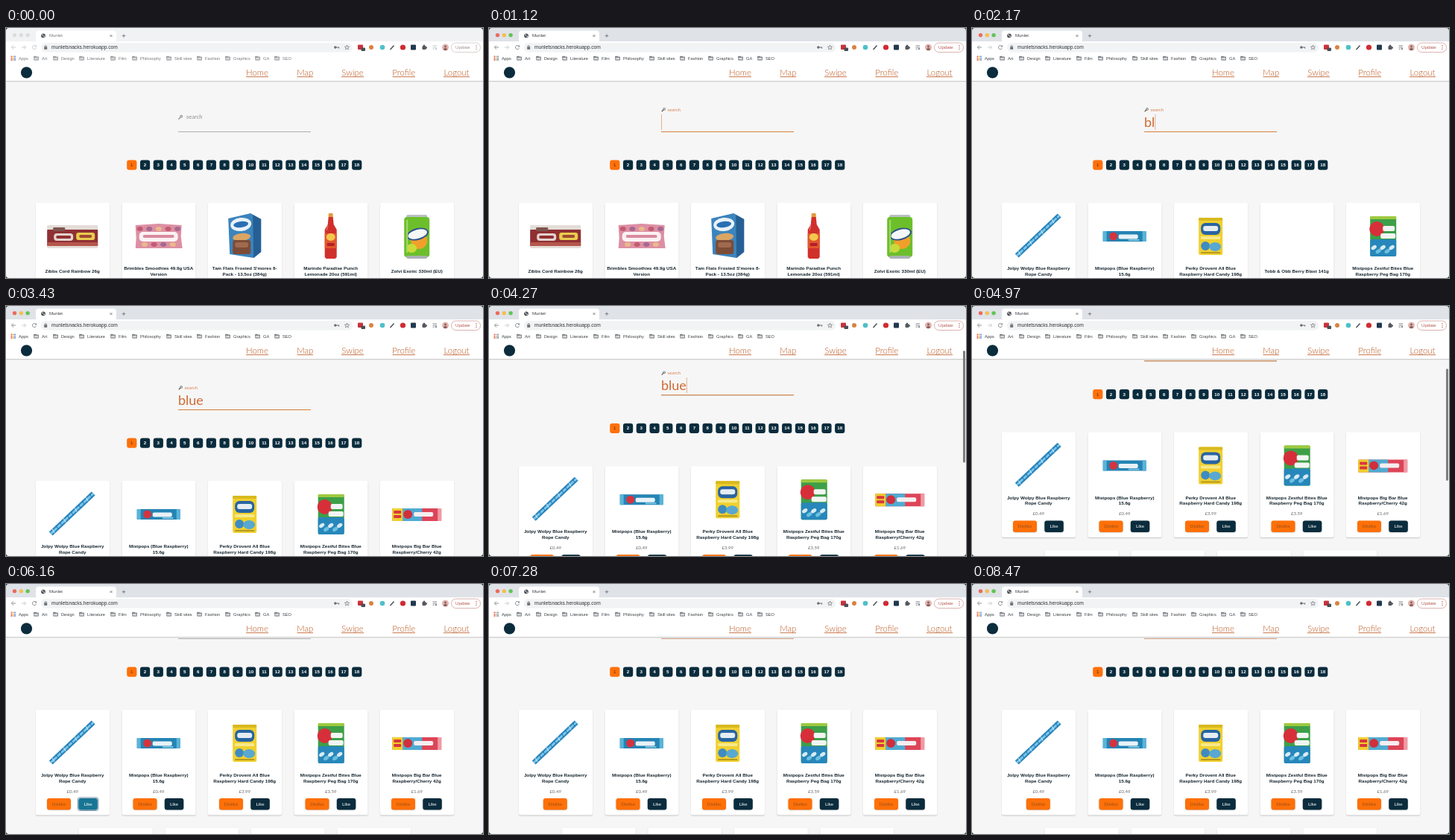
Recreate the animation shown at these times as an HTML page with a canvas. Size 640 by 336 pixels, loop 8.54 s.

```html
<!DOCTYPE html>
<html lang="en">
<head>
<meta charset="utf-8">
<title>Snack search</title>
<style>
html, body { margin: 0; width: 100%; height: 100%; overflow: hidden; background: #fff; }
canvas { display: block; width: 640px; height: 336px; }
</style>
</head>
<body>
<canvas id="stage"></canvas>
<script>
const W = 640, H = 336, LOOP = 8540, STEP = 70;
const NAVY = '#0a2c3d', ORANGE = '#ff7008', RUST = '#cf6a33', LINK = '#b9541c', INK = '#6a6e73';
const ARIAL = '"Liberation Sans", Arial, sans-serif', LATO = 'Lato, "Open Sans", sans-serif';

// moments of the interaction, in ms
const FOCUS = 840, BLUR = 5600, LIKED = 6580;
const KEYS = [[1820, 'b'], [2100, 'bl'], [2450, 'blu'], [2870, 'blue']];
const SCROLL = { from: 4120, to: 5040, by: 66 };

const canvas = document.getElementById('stage');
const ratio = window.devicePixelRatio || 1;
canvas.width = W * ratio;
canvas.height = H * ratio;
const c = canvas.getContext('2d');
c.scale(ratio, ratio);

const clamp = v => Math.max(0, Math.min(1, v));
const mix = (a, b, p) => a + (b - a) * p;

function box(x, y, w, h, fill, r = 0) {
  c.fillStyle = fill;
  c.beginPath();
  c.roundRect(x, y, w, h, r);
  c.fill();
}
function frame(x, y, w, h, color, width, r = 0) {
  c.strokeStyle = color;
  c.lineWidth = width;
  c.beginPath();
  c.roundRect(x, y, w, h, r);
  c.stroke();
}
function oval(x, y, rx, ry, fill, turn = 0) {
  c.fillStyle = fill;
  c.beginPath();
  c.ellipse(x, y, rx, ry, turn, 0, 7);
  c.fill();
}
const dot = (x, y, r, fill) => oval(x, y, r, r, fill);
function poly(fill, ...p) {
  c.fillStyle = fill;
  c.beginPath();
  for (let i = 0; i < p.length; i += 2) c.lineTo(p[i], p[i + 1]);
  c.closePath();
  c.fill();
}
function line(color, width, ...p) {
  c.strokeStyle = color;
  c.lineWidth = width;
  c.beginPath();
  for (let i = 0; i < p.length; i += 2) c.lineTo(p[i], p[i + 1]);
  c.stroke();
}
function text(s, x, y, font, fill, align = 'left', base = 'middle') {
  c.font = font;
  c.fillStyle = fill;
  c.textAlign = align;
  c.textBaseline = base;
  c.fillText(s, x, y);
}
function shadow(color, blur, dy) {
  c.shadowColor = color;
  c.shadowBlur = blur * ratio;
  c.shadowOffsetY = dy * ratio;
}
const noShadow = () => shadow('transparent', 0, 0);

// pack shots, drawn around their own centre
const art = {
  cord() {
    box(-34, -15, 68, 31, '#e4ddd8', 1);
    box(-34, -9, 68, 22, '#8f3033', 1);
    box(-34, 8, 68, 5, '#b5564c', 1);
    box(-26, -12, 16, 5, '#7d5550', 1);
    box(-25, -4, 26, 10, '#e3d3cd', 4);
    box(-22, -1, 20, 4, '#8f3033', 2);
    box(5, -5, 25, 10, '#e9cd4d', 3);
    box(9, -2, 17, 4, '#a04a34', 2);
  },
  pouch() {
    poly('#dd8fa3', -31, -15, 0, -17, 31, -15, 30, 0, 32, 16, 0, 16, -31, 16, -30, 2);
    for (let i = 0; i < 9; i++) {
      oval(-25 + i * 6.3, i % 2 ? 11 : -10, 4, 3, ['#c25a72', '#eab98a', '#a5688f'][i % 3]);
    }
    box(-26, -6, 52, 13, '#fbf2f4', 5);
    box(-21, -2, 42, 4, '#d98ba0', 2);
  },
  carton() {
    poly('#3c84bd', -22, -24, 8, -31, 22, -23, 22, 21, 12, 29, -20, 24);
    poly('#265f94', 11, -29, 22, -23, 22, 21, 12, 29);
    oval(-5, -16, 14, 9, '#e9f2f8', -0.12);
    oval(-5, -16, 10, 4, '#2a6fb4', -0.12);
    oval(-4, 1, 12, 5, '#dba563', -0.1);
    box(-16, 5, 24, 19, '#7d4c36', 3);
    box(-13, 8, 18, 7, '#a06a4e', 3);
  },
  bottle() {
    box(-3, -31, 6, 6, '#e39a3a', 1);
    poly('#d0302c', -3, -26, 3, -26, 4, -16, 8, -9, 8, 28, 6, 30, -6, 30, -8, 28, -8, -9, -4, -16);
    box(-8, -4, 16, 20, '#e2572c');
    oval(0, 1, 6, 5, '#f2c84c');
    box(-5, 9, 10, 4, '#b51e2d', 1);
    line('#f08a80', 1, -4, -15, -5.5, -8);
  },
  can() {
    box(-14, -29, 28, 5, '#b9c0c3', 2);
    box(-17, -26, 34, 54, '#6cbf2a', 4);
    box(-14, 26, 28, 4, '#a9b1b3', 2);
    dot(3, 6, 11, '#f0a02a');
    oval(-7, 16, 7, 6, '#c8db39');
    oval(1, -3, 15, 8, '#2c4f8f', -0.25);
    oval(1, -3, 13, 6, '#f4f7f5', -0.25);
    line('#a5d970', 2, -13, -22, -13, 22);
  },
  stick() {
    line('#2c86bd', 7, -29, 26, 28, -28);
    line('#7cc8ec', 2.5, -29, 26, 28, -28);
    for (let i = 0; i < 11; i++) {
      const x = -26 + i * 5, y = 23 - i * 4.75;
      line(i % 3 ? '#1f6fa8' : '#d9eef8', 1, x - 1, y - 3, x + 2, y + 2);
    }
  },
  bar() {
    box(-29, -7, 58, 14, '#2484b4', 1);
    box(-29, -7, 5, 14, '#5ab4d8');
    box(24, -7, 5, 14, '#5ab4d8');
    dot(-15, 0, 5.5, '#d5333f');
    box(-8, -2.5, 26, 6, '#e8f2f7', 2);
    box(5, 4, 15, 2, '#7ac4e0', 1);
  },
  bag() {
    box(-16, -25, 32, 50, '#f0d02f', 2);
    box(-16, -25, 32, 4, '#d8b91f', 1);
    box(-13, -18, 26, 16, '#2864a2', 6);
    box(-10, -14, 20, 7, '#e4edf2', 3);
    box(-13, 0, 26, 4, '#f7e98a', 1);
    oval(-7, 13, 6, 6, '#3f8bc0');
    oval(6, 14, 8, 6, '#58a8d2');
    box(-13, 21, 26, 2, '#b69a20');
  },
  bites() {
    box(-17, -27, 35, 54, '#3d9f48', 2);
    box(-17, 4, 35, 23, '#2787bb', 2);
    box(-17, -27, 35, 4, '#9fca3f', 1);
    dot(-8, -10, 10, '#d62f3a');
    box(0, -14, 16, 7, '#f2f5f3', 2);
    box(-3, -4, 20, 7, '#f2f5f3', 2);
    for (let i = 0; i < 5; i++) oval(-12 + i * 6, 15 + i % 2 * 5, 4, 2.5, i % 2 ? '#6cc0df' : '#d8eaf2', -0.6);
  },
  bigBar() {
    box(-33, -8, 66, 17, '#dd4557', 1);
    box(-19, -8, 26, 17, '#4fabd2');
    box(-33, -8, 14, 17, '#f0cf2e', 1);
    box(-31, -5, 10, 4, '#d8383d', 1);
    box(-31, 1, 10, 4, '#d8383d', 1);
    dot(-12, 0, 6, '#d02f3b');
    box(-4, -3, 26, 6, '#f5eef0', 2);
    box(28, -8, 5, 17, '#ef9aa6');
  }
};

const item = (pic, price, ...title) => ({ pic, price, title });
const stick = item('stick', '£0.49', 'Jolpy Wolpy Blue Raspberry', 'Rope Candy');
const bar = item('bar', '£0.49', 'Mistpops (Blue Raspberry)', '15.6g');
const bag = item('bag', '£3.99', 'Perky Drovent All Blue', 'Raspberry Hard Candy 198g');
const blast = item('', '£1.99', 'Tobb & Obb Berry Blast 141g');
const bites = item('bites', '£3.59', 'Mistpops Zestful Bites Blue', 'Raspberry Peg Bag 170g');
const bigBar = item('bigBar', '£1.69', 'Mistpops Big Bar Blue', 'Raspberry/Cherry 42g');
const all = [
  item('cord', '£1.49', 'Zibbs Cord Rainbow 26g'),
  item('pouch', '£1.29', 'Brimbles Smoothies 49.9g USA', 'Version'),
  item('carton', '£4.99', "Tam Flats Frosted S'mores 8-", 'Pack - 13.5oz (384g)'),
  item('bottle', '£2.99', 'Marindo Paradise Punch', 'Lemonade 20oz (591ml)'),
  item('can', '£1.29', 'Zolvi Exotic 330ml (EU)')
];
function results(query) {
  if (query.length < 2) return all;
  return query === 'bl' ? [stick, bar, bag, blast, bites] : [stick, bar, bag, bites, bigBar];
}

function magnifier(x, y, s) {
  line('#6b4a35', 1.3 * s, x - 2.6 * s, y + 2.8 * s, x, y);
  dot(x + 1.2 * s, y - 1.2 * s, 2 * s, '#54606a');
  dot(x + 1.2 * s, y - 1.2 * s, 1.2 * s, '#c3dbe6');
}

function folder(x, color) {
  box(x - 3.2, 37.8, 3.4, 2, color, 0.5);
  box(x - 3.2, 38.6, 6.6, 4.8, color, 0.6);
  box(x - 2.4, 39.7, 5, 2.8, '#d5d7d9');
}

// the window is dimmed until it is clicked
function browser(active) {
  const arrow = active ? '#85888d' : '#c6c8cb';
  const label = active ? '#3c4043' : '#77797c';
  const alert = active ? '#b8564e' : '#a08c8a';
  const lights = active ? ['#ec6a5e', '#f4be4f', '#61c454'] : ['#dcdcdc', '#dcdcdc', '#dcdcdc'];

  box(0, 0, W, 18, active ? '#dfe2e7' : '#f1f2f3');
  lights.forEach((f, i) => dot(11.5 + i * 8.8, 9.6, 2.7, f));
  box(40, 3.5, 108, 16, '#fff', 4);
  dot(50, 10.3, 2.9, '#4f5357');
  oval(49, 9.4, 1.2, 0.8, '#c9cbcd', 0.6);
  oval(51.2, 11.4, 0.9, 1.1, '#c9cbcd');
  text('Munlet', 58, 10.5, '6px ' + ARIAL, label);
  line(INK, 0.8, 139.5, 9, 142.5, 12);
  line(INK, 0.8, 142.5, 9, 139.5, 12);
  line(INK, 0.8, 155.7, 10.5, 160.3, 10.5);
  line(INK, 0.8, 158, 8.2, 158, 12.8);

  box(0, 18, W, 30, '#fff');
  line(arrow, 0.9, 13, 26, 7.5, 26);
  line(arrow, 0.9, 10, 23.4, 7.4, 26, 10, 28.6);
  line('#c6c8cb', 0.9, 21, 26, 26.5, 26);
  line('#c6c8cb', 0.9, 24, 23.4, 26.6, 26, 24, 28.6);
  c.strokeStyle = arrow;
  c.beginPath();
  c.arc(38, 26, 2.6, 0.3, 5.5);
  c.stroke();
  poly(arrow, 38.4, 25.4, 41, 25.4, 41, 22.8);
  box(47, 20, 418, 12.5, '#f1f3f4', 6);
  box(51.2, 25.3, 4, 3.4, INK, 0.5);
  c.strokeStyle = INK;
  c.beginPath();
  c.arc(53.2, 25, 1.3, Math.PI, 0);
  c.stroke();
  text('munletsnacks.herokuapp.com', 61, 26.4, '6.7px ' + ARIAL, '#303236');

  dot(441.8, 26, 1.7, INK);
  line(INK, 1.1, 443, 26, 446.6, 26, 446.6, 27.6);
  c.lineWidth = 0.7;
  c.beginPath();
  for (let i = 0; i < 10; i++) {
    const r = i % 2 ? 1.4 : 3.2, a = i * Math.PI / 5 - Math.PI / 2;
    c.lineTo(457.5 + r * Math.cos(a), 26.2 + r * Math.sin(a));
  }
  c.closePath();
  c.stroke();
  box(472, 22.5, 7, 6.5, '#c9323c', 1);
  box(476.5, 26.5, 5.5, 4.5, '#4a4f55', 1);
  dot(490, 26, 3, '#d9823f');
  dot(505, 26, 3.3, '#4fc0c8');
  line('#4f565c', 1.6, 515.5, 29, 520.5, 23.5);
  dot(532.5, 26, 3.6, '#d02b33');
  box(543, 22.5, 7, 7, '#20394e', 1);
  box(558.5, 24, 5, 5, '#55595e', 1);
  dot(561, 23.8, 1.2, '#55595e');
  dot(563.8, 26.5, 1.2, '#55595e');
  for (let i = 0; i < 3; i++) line(arrow, 0.9, 572.5, 23.8 + i * 2.2, i < 2 ? 578 : 575, 23.8 + i * 2.2);
  dot(577, 28, 1.2, arrow);
  dot(589.5, 26, 4.5, '#dfb5af');
  dot(589.5, 25, 1.4, '#8a5a58');
  oval(589.5, 28.4, 2.4, 1.5, '#8a5a58');
  frame(597.5, 20, 39, 12.5, active ? '#d3a09b' : '#cfc6c5', 0.8, 6);
  text('Update', 603, 26.5, '6.1px ' + ARIAL, alert);
  for (let i = 0; i < 3; i++) dot(631, 23.8 + i * 2.3, 0.7, alert);

  for (let i = 0; i < 9; i++) {
    box(6.6 + i % 3 * 2.3, 37.5 + Math.floor(i / 3) * 2.3, 1.6, 1.6, ['#dd5144', '#f0a93b', '#4f86d8'][i % 3]);
  }
  const tabs = { Art: 48, Design: 74, Literature: 109, Film: 151, Philosophy: 180, 'Skill sites': 226,
    Fashion: 267, Graphics: 305, GA: 345, SEO: 371 };
  text('Apps', 17, 41, '5.7px ' + ARIAL, label);
  for (const name in tabs) {
    folder(tabs[name] - 7.5, active ? '#777b80' : '#96999d');
    text(name, tabs[name], 41, '5.7px ' + ARIAL, label);
  }
}

function nav() {
  box(0, 47, W, 24, '#fff');
  box(0, 47, W, 0.6, '#e2e2e2');
  box(0, 71, W, 1, '#cdcdcd');
  box(0, 72, W, 1, '#ededed');
  dot(27.5, 59.8, 7.6, NAVY);
  [['Home', 322, 352], ['Map', 390.5, 412], ['Swipe', 450, 480], ['Profile', 518.5, 549], ['Logout', 587, 622]]
    .forEach(([s, a, b]) => {
      text(s, (a + b) / 2, 63.7, '300 11.4px ' + LATO, LINK, 'center', 'alphabetic');
      line(LINK, 0.8, a, 65.6, b, 65.6);
    });
}

function search(t, query) {
  const focused = t >= FOCUS && t < BLUR;
  const p = clamp((t - FOCUS) / 200), lift = 1 - (1 - p) ** 2;
  c.globalAlpha = mix(0.6, 1, lift);
  magnifier(234, mix(120, 110, lift), mix(1, 0.88, lift));
  c.globalAlpha = 1;
  text('search', mix(242, 239.5, lift), mix(120, 110, lift), mix(7.6, 6.2, lift) + 'px ' + LATO,
    focused ? '#dc7f52' : '#8f8f8f');

  line(t >= LIKED ? '#cf9b7c' : '#adadad', 1, 231, 139.5, 409, 139.5);
  if (focused) line('#d5803f', 1, 320 - 89 * lift, 139.5, 320 + 89 * lift, 139.5);

  text(query, 231, 133, '18px ' + LATO, RUST, 'left', 'alphabetic');
  const last = KEYS.reduce((at, k) => t >= k[0] ? k[0] : at, FOCUS);
  if (focused && (t - last) % 1000 < 500) {
    const x = 231.5 + (query ? c.measureText(query).width : 0);
    line('#e0966f', 0.7, x, 116, x, 137);
  }
}

function pager() {
  for (let i = 0; i < 18; i++) {
    const x = 168.8 + i * 17.76;
    box(x - 6.6, 177.6, 13.2, 13.2, i ? NAVY : ORANGE, 3);
    text(i + 1, x, 184.5, (i ? 'bold ' : '') + '6.2px ' + ARIAL, i ? '#fff' : '#4a2a18', 'center');
  }
}

function button(x, w, label, fill, ink) {
  shadow('rgba(0,0,0,.25)', 1.5, 0.5);
  box(x, 354, w, 15.5, fill, 3);
  noShadow();
  text(label, x + w / 2, 362, '6.4px ' + LATO, ink, 'center');
}

function panel(x, y) {
  shadow('rgba(0,0,0,.2)', 1.5, 1);
  box(x, y, 99, 141.5, '#fff', 2);
  noShadow();
}

function card(it, i, t) {
  const x = 40 + i * 115.5, mid = x + 49.2;
  panel(x, 235);
  if (it.pic) {
    c.save();
    c.translate(mid, 280);
    art[it.pic]();
    c.restore();
  }
  const top = 327.2 - (it.title.length - 1) * 3.75;
  it.title.forEach((s, n) => text(s, mid, top + n * 7.5, 'bold 6.25px ' + ARIAL, '#17262f', 'center'));
  text(it.price, mid, 344.8, '6px ' + LATO, '#666', 'center');

  const picked = i === 0 && t >= BLUR;
  if (picked && t >= LIKED) return button(x + 32.8, 32, 'Dislike', ORANGE, '#98501c');
  button(x + 15, 32, 'Dislike', ORANGE, '#98501c');
  button(x + 57.3, 25.5, 'Like', picked ? '#177594' : NAVY, '#fff');
  if (picked) frame(x + 56.3, 353, 27.5, 17.5, '#6f8fa8', 1, 3);
}

function draw(t) {
  const query = KEYS.reduce((s, k) => t >= k[0] ? k[1] : s, '');
  const p = clamp((t - SCROLL.from) / (SCROLL.to - SCROLL.from));
  const scroll = SCROLL.by * (1 - (1 - p) ** 2);

  box(0, 0, W, H, '#24433f');
  c.save();
  c.beginPath();
  c.roundRect(0, 0, W, H, 4);
  c.clip();
  box(0, 47, W, H - 47, '#f6f6f6');

  c.save();
  c.translate(0, -scroll);
  search(t, query);
  pager();
  results(query).forEach((it, i) => card(it, i, t));
  for (let i = 0; i < 4; i++) panel(97.8 + i * 115.5, 394);
  c.restore();

  nav();
  browser(t >= FOCUS);
  if (p > 0) {
    c.globalAlpha = clamp((5600 - t) / 200);
    box(636, 49.5 + scroll * 0.53, 3, 150.5, '#7d7d7d', 1.5);
    c.globalAlpha = 1;
  }
  c.restore();
}

const start = performance.now();
function tick() {
  const t = (performance.now() - start) % LOOP;
  draw(Math.floor(t / STEP) * STEP);
  requestAnimationFrame(tick);
}
tick();
</script>
</body>
</html>
```
